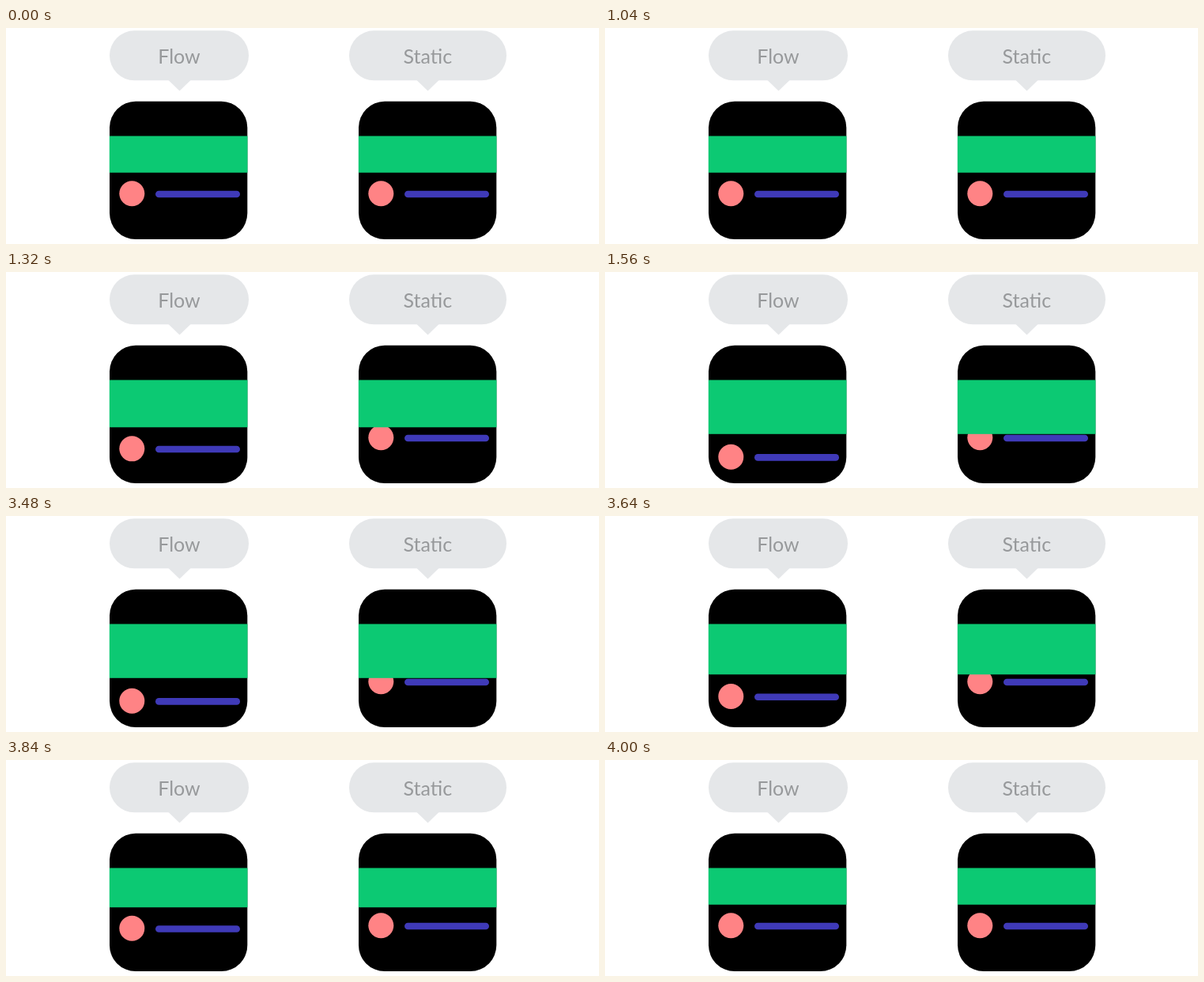
Write an HTML page that moves like this. It is 750 px wide and 273 px high and loops after 5.04 s.

```html
<!DOCTYPE html>
<html lang="en">
<head>
<meta charset="utf-8">
<title>Flow and Static</title>
<style>
  html, body { margin: 0; width: 100%; height: 100%; overflow: hidden; background: #fff; }
  svg { display: block; width: 100%; height: 100%; }
  text { font: 400 25px Lato, sans-serif; fill: #97999b; text-anchor: middle; }
  .bubble { fill: #e5e7e9; }
  .bar { fill: #0cc973; }
  .dot { fill: #ff8385; }
  .line { fill: #3f3ab8; }
</style>
</head>
<body>
<svg viewBox="0 0 750 273">
  <rect width="750" height="273" fill="#fff"/>
  <g class="bubble">
    <rect x="131" y="3.3" width="176" height="63" rx="31.5"/>
    <path d="M205.5 66L219.5 79.5L233.5 66Z"/>
    <rect x="434" y="3.3" width="199" height="63" rx="31.5"/>
    <path d="M519.5 66L533.5 79.5L547.5 66Z"/>
  </g>
  <text x="219" y="45">Flow</text>
  <text x="533.3" y="45">Static</text>
  <g id="cards"></g>
</svg>
<script>
const LOOP = 5040, STEP = 40, MOVE = 500;
const OPEN_AT = 1040, CLOSE_AT = 3480;
const BAR_HEIGHT = 46.3, GROW = 22, EXTRA_GAP = 2.4;

const card = x => `<g transform="translate(${x} 0)">
  <rect y="92.8" width="174.3" height="174.3" rx="33"/>
  <g class="item">
    <circle class="dot" cx="28.3" cy="209.3" r="16"/>
    <rect class="line" x="58" y="205.7" width="107" height="8.6" rx="4.3"/>
  </g>
  <rect class="bar" x="-0.2" y="136.5" width="174.7" height="${BAR_HEIGHT}"/>
</g>`;

document.getElementById('cards').innerHTML = card(131) + card(446);
const bars = document.querySelectorAll('.bar');
const flowItem = document.querySelector('.item');

function ease(p) {
  p = Math.min(1, Math.max(0, p));
  return p < 0.5 ? 2 * p * p : 1 - 2 * (1 - p) ** 2;
}

function draw(time) {
  const t = Math.floor((time % LOOP) / STEP) * STEP;
  const open = ease((t - OPEN_AT) / MOVE) - ease((t - CLOSE_AT) / MOVE);
  bars.forEach(bar => bar.setAttribute('height', BAR_HEIGHT + GROW * open));
  const shift = GROW * open + EXTRA_GAP * open ** 3;
  flowItem.setAttribute('transform', `translate(0 ${shift})`);
}

let start;
function tick(now) {
  start ??= now;
  draw(now - start);
  requestAnimationFrame(tick);
}
draw(0);
requestAnimationFrame(tick);
</script>
</body>
</html>
```
